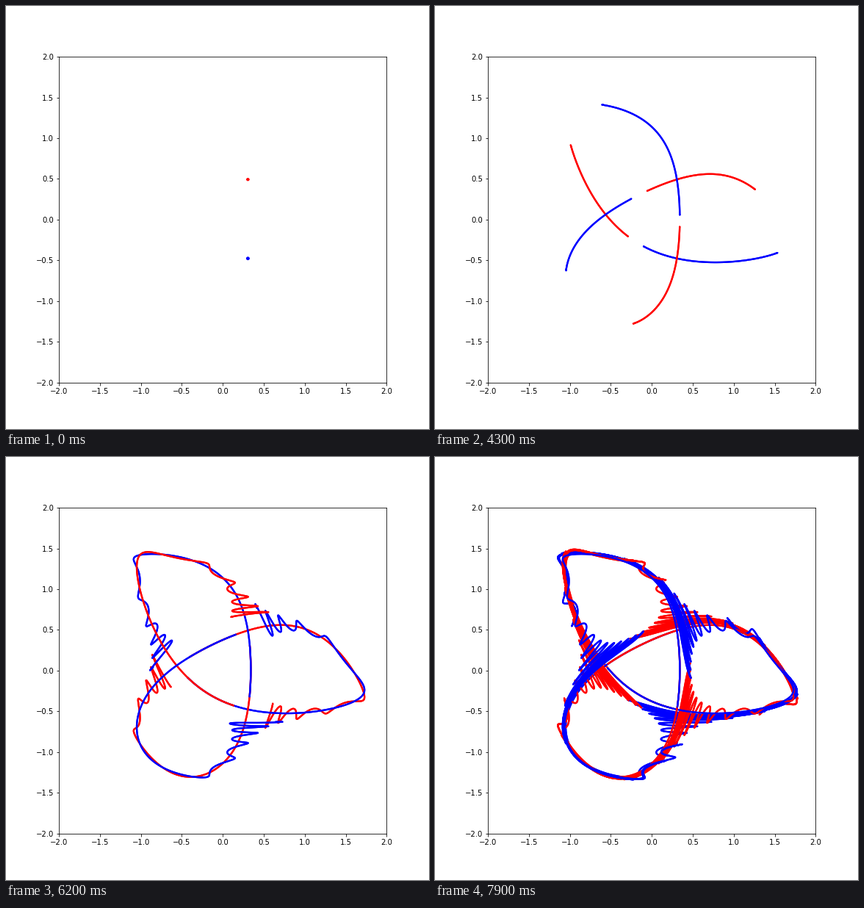
These frames come from a looping animation (576 px wide and 576 px high, 8 s). A matplotlib script:

```python
"""Stable and unstable manifolds of a period-3 saddle in a kicked rotation map."""
import numpy as np
import matplotlib.pyplot as plt
from matplotlib.animation import FuncAnimation

ALPHA = 2.0305            # rotation angle per step
C, S = np.cos(ALPHA), np.sin(ALPHA)
FRAMES = 80
SAMPLES = 8000


def kick(x):
    return 0.2525 * x**2 - 0.255 * x**3


def forward(p):
    x, y = p
    u = C * x + S * y
    return np.array([u, -S * x + C * y + kick(u)])


def backward(p):
    x, y = p
    v = y - kick(x)
    return np.array([C * x - S * v, S * x + C * v])


def saddle_x():
    """Bisect the symmetry condition of the period-3 orbit."""
    slope = np.tan(ALPHA / 2)

    def gap(x):
        x1 = x * (2 * C - 1) + kick(x) * S
        return x * slope * (1 + 2 * C) - kick(x) * C - kick(x1) / 2

    lo, hi = 0.2, 0.45
    for _ in range(60):
        mid = (lo + hi) / 2
        lo, hi = (mid, hi) if gap(mid) > 0 else (lo, mid)
    return lo


def ring(center, radius):
    t = np.linspace(0, 2 * np.pi, SAMPLES)
    return np.array([center[0] + radius * np.cos(t),
                     center[1] + radius * np.sin(t)])


def orbit(start, step):
    curves = [start]
    for _ in range(FRAMES - 1):
        curves.append(step(curves[-1]))
    return curves


x0 = saddle_x()
y0 = x0 * np.tan(ALPHA / 2)
unstable = orbit(ring((x0, y0), 0.0096), forward)
stable = orbit(ring((x0, kick(x0) - y0), 0.0115), backward)

plt.rcParams["agg.path.chunksize"] = 4000
fig, ax = plt.subplots(figsize=(8, 8), dpi=72)
ax.set_xlim(-2, 2)
ax.set_ylim(-2, 2)

# The last three images cover every earlier one; newest is drawn on top.
style = dict(lw=2.3, solid_joinstyle="round", solid_capstyle="round")
layers = []
for age in (2, 1, 0):
    for curves, color in ((unstable, "red"), (stable, "blue")):
        line, = ax.plot([], [], color=color, **style)
        layers.append((line, curves, age))


def update(n):
    for line, curves, age in layers:
        if n >= age:
            line.set_data(*curves[n - age])
        else:
            line.set_data([], [])
    return [layer[0] for layer in layers]


anim = FuncAnimation(fig, update, frames=FRAMES, interval=100,
                     repeat=True, repeat_delay=0, blit=False)
plt.show()
```
